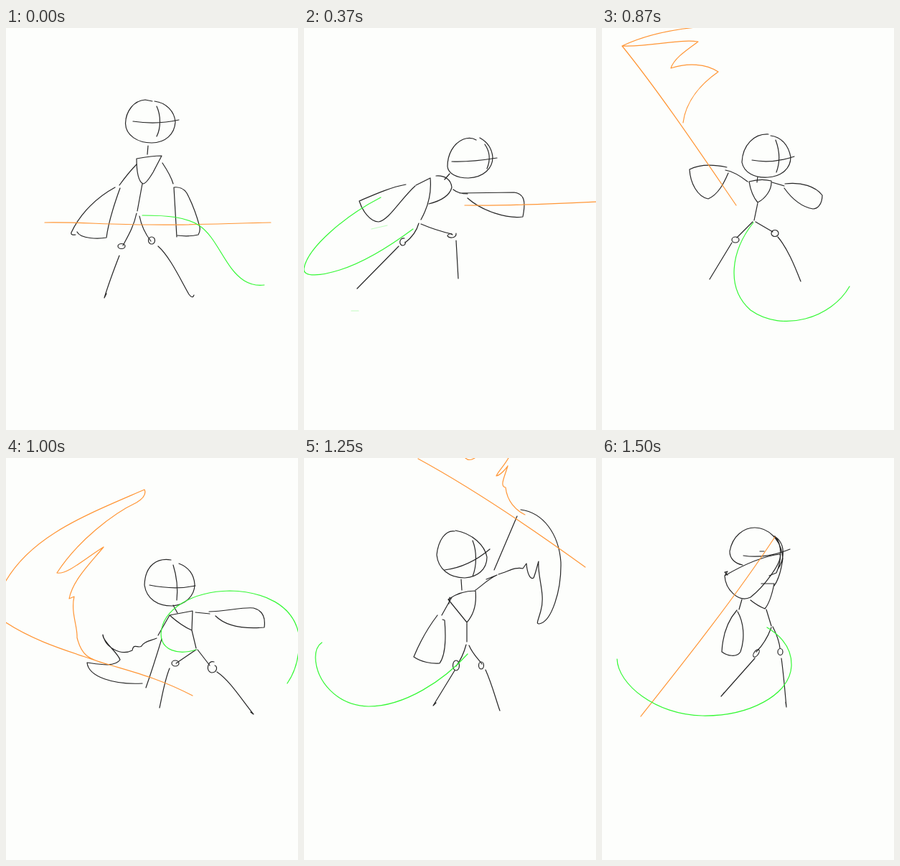
Animation of 407 by 560 pixels, one loop 1.62 s. Source, as an HTML page:

```html
<!DOCTYPE html>
<html lang="en">
<head>
<meta charset="utf-8">
<title>Sword swing sketch</title>
<style>
  html, body { margin: 0; width: 100%; height: 100%; overflow: hidden; background: #fdfefc; }
  .strip { display: flex; width: 4477px; height: 560px; animation: play 1620ms step-end infinite; }
  svg { flex: none; width: 407px; height: 560px; overflow: hidden; fill: none; stroke: #262626;
        stroke-width: 1.2; stroke-linecap: round; stroke-linejoin: round; }
  .sword { stroke: #ff9636; }
  .tail { stroke: #35f835; }
  .faint { stroke: #35f835; opacity: .3; }
  /* one pose per step along the strip */
  @keyframes play {
    0% { transform: translateX(0); }
    7.4074% { transform: translateX(-407px); }
    15.4321% { transform: translateX(-814px); }
    22.8395% { transform: translateX(-1221px); }
    46.2963% { transform: translateX(-1628px); }
    53.7037% { transform: translateX(-2035px); }
    61.7284% { transform: translateX(-2442px); }
    69.1358% { transform: translateX(-2849px); }
    77.1605% { transform: translateX(-3256px); }
    84.5679% { transform: translateX(-3663px); }
    92.5926%, 100% { transform: translateX(-4070px); }
  }
</style>
</head>
<body>
<div class="strip">

<!-- stand -->
<svg>
  <path d="M204 102L194 100C178 101 167 116 166.500 133C167 150 184 160 203 160C222 160 235 148 236 131C235 116 223 104 207 102M177 130C197 133 219 133 241 128M210 109C216 122 216 139 210 151M198 164L197 176"/>
  <path d="M182 182C193 180 205 178 217 178L205 201C199 211 194 217 191 217C185 214 182 201 182 182M190 217L183 255"/>
  <path d="M182 190C174 198 166 208 158 219M152 222C128 235 104 257 91 285Q90 289 97 288M159 223C151 245 143 268 140 292C129 294 104 294 99 284"/>
  <path d="M218 188C224 197 230 206 233 217M238 291L234 222C241 221 248 224 252 230C259 243 266 262 270 277Q271 283 268 288C259 290 247 290 239 289"/>
  <path d="M182 258C178 277 170 290 163 303M186 262C189 277 195 288 202 297M158 317C151 335 144 353 137 376L140 370M212 304C228 318 243 350 255 371Q260 378 262 372"/>
  <ellipse cx="161" cy="304" rx="5" ry="3.500"/><ellipse cx="203" cy="296" rx="4.500" ry="5"/>
  <path class="sword" d="M54 271C100 270 140 274 200 274C260 275 310 272 369 271"/>
  <path class="tail" d="M190 261C225 261 250 263 269 275C295 292 305 335 332 352Q345 360 360 358"/>
</svg>

<!-- wind up -->
<svg>
  <path d="M131 163C110 162 98 183 97 207C97 222 110 230 126 230C146 229 163 216 164 197C162 182 149 170 133 168M106 210C128 212 147 205 164 197M138 175C142 192 142 215 133 226"/>
  <path d="M133 230L113 241M131 228C133 238 155 243 184 243M159 207C172 213 181 230 185 245C190 262 194 277 200 286L212 298"/>
  <path d="M111 238C88 245 66 259 52 273L57 276C58 285 64 291 73 291C92 289 101 268 110 246"/>
  <path d="M172 212C184 218 192 225 196 232M191 236C182 254 168 265 151 274M198 234C206 247 210 262 208 275C205 286 193 287 181 287C168 286 160 284 157 277"/>
  <path d="M190 278L154 297M151 308C149 325 145 340 143 357L145 350M223 309C239 323 252 348 269 366L264 363"/>
  <ellipse cx="152" cy="299" rx="4" ry="4"/><ellipse cx="214" cy="302" rx="4" ry="3.500"/>
  <path class="sword" d="M6 272C80 275 180 274 260 271Q320 269 331 272M29 278L31 279"/>
  <path class="tail" d="M222 287C240 307 265 314 291 314C340 312 385 275 393 232Q395 215 381 204"/>
</svg>

<!-- lunge -->
<svg>
  <path d="M187 157C168 156 152 170 149 198C151 212 163 219 180 219C200 218 213 205 213 188C211 173 201 162 189 159M156 199C178 201 198 195 216 188M196 166C202 182 201 200 194 213M168 219L160 228"/>
  <path d="M150 224C166 220 184 224 196 234C192 244 182 248 172 248M168 223C178 240 183 254 180 276"/>
  <path d="M147 227L126 232M124 229C104 234 82 246 65 257C69 273 79 281 90 280C105 277 116 254 125 235"/>
  <path d="M196 231L212 236M213 234C234 235 252 240 259 250C261 263 258 272 255 275C236 275 220 261 210 242"/>
  <path d="M179 278L147 297M182 278L210 294M141 305L108 360M217 301C227 318 234 340 242 358"/>
  <ellipse cx="145" cy="299" rx="4.500" ry="4"/><ellipse cx="211" cy="296" rx="4.500" ry="3.500"/>
  <path class="sword" d="M115 261C200 262 290 260 369 257"/>
  <path class="tail" d="M187 283C200 320 180 359 135 365C95 368 62 345 54 318"/>
</svg>

<!-- thrust, held -->
<svg>
  <path d="M240 156C235 153 228 153 222 155C208 161 200 176 200 193C201 203 213 209 229 209C251 208 263 195 263 180C262 169 256 159 245 153M252 162C259 172 260 184 255 196M206 186C228 187 250 184 269 181M203 203L196 211"/>
  <path d="M184 206C196 205 205 211 206 222C203 234 190 241 174 245M156 219L176 209C178 230 173 249 163 267"/>
  <path d="M142 218C120 222 98 232 77 241C81 254 92 270 104 270C118 268 135 238 155 220"/>
  <path d="M208 225C214 230 222 231 228 231M217 230L293 229C308 231 309 243 305 263C283 266 248 255 228 237"/>
  <path d="M160 272C157 283 150 292 141 299M163 273C177 279 193 284 206 287M132 304L74 363M212 296L215 349"/>
  <path d="M140 293C132 292 132 303 138 303Q142 302 141 298M212 286C213 294 200 293 200 289Q203 285 207 288"/>
  <path class="sword" d="M224 247C285 248 345 245 408 242"/>
  <path class="tail" d="M107 236C60 260 5 305 0 335C-2 348 25 345 50 337C85 326 125 300 152 280"/>
  <path class="faint" d="M94 280L116 275M66 394H76"/>
</svg>

<!-- raise -->
<svg>
  <path d="M239 155C222 150 202 165 198 195C200 207 215 211 231 211C250 210 262 199 262 184C261 168 249 156 229 156M248 162C257 175 257 192 249 204M219 189C240 193 260 190 272 180M200 205L193 213"/>
  <path d="M203 170C190 158 178 148 163 139C164 122 178 103 195 93C206 106 214 130 212 160"/>
  <path d="M211 207L209 217M183 206C195 205 210 209 210 217C208 228 188 239 171 244C171 231 176 217 183 208M178 206L158 215M169 245L158 271"/>
  <path d="M157 214C130 217 103 227 81 241L91 235C84 244 88 257 105 261Q118 263 125 254L157 214"/>
  <path d="M155 273L141 298M160 272L191 280M132 308L121 318M115 323L88 351M199 285C205 300 206 325 209 349"/>
  <ellipse cx="136" cy="302" rx="6" ry="4" transform="rotate(-25 136 302)"/><ellipse cx="194" cy="278" rx="5" ry="4"/>
  <path class="sword" d="M148 181L220 93C245 65 280 25 306 -1M220 93C235 80 262 67 282 66Q298 67 305 79C298 55 304 41 314 41C335 42 360 65 366 86C365 74 370 70 378 75C400 95 388 130 382 162C392 135 398 105 396 80C393 40 375 5 348 -1"/>
  <path class="tail" d="M153 270C172 310 172 340 157 365C140 390 105 397 70 384C30 370 8 340 10 318Q13 302 33 287M123 308L119 318"/>
</svg>

<!-- swing over -->
<svg>
  <path d="M232 148C212 147 196 163 195 187C198 202 213 209 231 208C251 207 263 195 263 180C260 163 250 152 235 150M242 156C248 172 248 188 243 201M209 184C230 188 250 185 268 179M217 207L216 215"/>
  <path d="M205 214C216 211 228 211 236 213C237 226 227 238 217 243C211 236 207 226 205 214M217 244L212 268"/>
  <path d="M203 214C194 207 184 200 172 198M174 194C155 190 136 190 122 197C123 216 133 235 148 238C162 232 170 216 176 202"/>
  <path d="M237 215L254 220M255 217C278 214 298 221 307 233C307 246 300 252 294 252C277 249 264 237 254 223"/>
  <path d="M210 270L188 292M214 270L238 284M181 299L150 350M245 291C258 306 268 330 277 353"/>
  <ellipse cx="186" cy="295" rx="5" ry="4"/><ellipse cx="241" cy="286" rx="5" ry="4.500"/>
  <path class="sword" d="M187 247C137 174 82 92 28 25C70 5 130 -5 205 -4M28 25C65 27 106 15 134 19C116 32 100 43 96 56C120 48 145 50 162 61C139 77 117 101 113 132"/>
  <path class="tail" d="M211 271C180 310 172 362 207 393C252 425 320 404 345 360"/>
</svg>

<!-- slash down -->
<svg>
  <path d="M230 142C212 139 194 148 193 177C196 197 212 206 231 206C250 205 263 192 263 176C262 162 254 152 241 147M233 149C238 165 240 180 238 198M200 177C220 181 240 183 264 178M233 205L239 216"/>
  <path d="M212 247L228 219L260 213L259 240C247 235 237 227 228 219M259 240L265 265"/>
  <path d="M264 215L284 217M283 214C305 214 332 207 345 209Q363 214 360 236C335 238 308 236 292 220"/>
  <path d="M210 251C200 255 192 256 189 262C184 266 178 257 176 268C160 276 138 264 135 246C134 255 155 270 159 281C152 292 128 287 113 285C115 305 150 316 190 314M217 252C210 275 203 297 195 320"/>
  <path d="M265 267L237 286M267 267L284 289M228 293C221 310 218 330 214 348M294 298C312 310 328 336 345 357L341 354"/>
  <ellipse cx="236" cy="286" rx="5" ry="4"/><path d="M290 284C281 281 278 297 286 299C295 299 295 290 291 289"/>
  <path class="sword" d="M260 331C200 300 160 295 110 277C70 264 30 250 -5 226M-5 180C30 110 110 80 193 44Q197 53 182 62C150 77 100 115 71 160C85 163 110 140 136 124C118 146 93 170 88 196L95 193C90 215 100 235 99 250C105 275 115 280 140 287"/>
  <path class="tail" d="M265 267C240 275 216 268 216 245C218 210 260 186 312 185C360 186 400 205 408 245C410 270 405 295 392 314"/>
</svg>

<!-- rise -->
<svg>
  <path d="M221 121C203 119 190 133 189 156C192 176 207 187 228 187C246 186 259 174 259 157C257 140 244 127 226 122M235 132C240 147 241 167 237 181M198 167C219 168 241 163 262 153M226 188L229 200"/>
  <path d="M214 208C225 202 237 199 250 199C250 214 248 226 243 235C231 229 222 219 214 208M243 235L246 263"/>
  <path d="M214 209L202 233M200 235C187 251 178 270 171 288C179 296 191 299 201 298C207 280 208 258 205 236"/>
  <path d="M251 200L277 190M277 186C296 164 312 146 328 139C351 145 360 170 357 211C336 220 310 209 280 194"/>
  <path d="M246 265L225 288M248 265L266 288M219 296L198 347M274 297C287 310 299 333 309 355"/>
  <ellipse cx="224" cy="288" rx="5" ry="5"/><ellipse cx="268" cy="290" rx="5" ry="5.500"/>
  <path class="sword" d="M326 241C248 196 150 145 62 114C76 77 115 35 172 16C151 39 127 61 123 82C146 67 164 63 185 66C172 89 180 115 205 175"/>
  <path class="tail" d="M247 267C258 320 247 382 198 404C145 422 91 392 77 350"/>
</svg>

<!-- overhead -->
<svg>
  <path d="M210 102C197 100 187 115 185 135C187 155 203 167 224 167C242 166 255 155 255 138C252 122 235 105 211 101M235 115C241 130 241 150 235 165M196 156C220 153 240 143 259 127M219 169L220 184"/>
  <path d="M201 197C212 189 225 185 239 185C241 205 235 220 227 229L201 197L206 194L192 219M202 203L203 194M227 230L227 256"/>
  <path d="M239 184C248 178 256 169 269 163L254 169M265 156L297 81M271 162C285 158 295 151 305 154L310 147C311 160 315 170 320 167C323 160 325 150 327 144C325 165 337 190 330 213C326 228 323 231 328 231C345 228 359 185 358 145C355 105 333 76 302 72"/>
  <path d="M186 219C170 240 160 260 153 277C163 284 178 287 189 286C197 275 198 250 196 226L193 225"/>
  <path d="M226 260C222 275 218 282 212 290M230 261C235 273 243 280 248 287M210 296L180 345L184 341M253 295C262 315 267 335 273 352"/>
  <ellipse cx="212" cy="289" rx="4.500" ry="7"/><ellipse cx="247" cy="289" rx="3.500" ry="5"/>
  <path class="sword" d="M159 1C240 45 320 100 392 152M225 0Q230 5 238 0M286 -2C280 10 271 18 268 25C275 24 285 10 284 11C280 25 272 40 281 41C283 60 295 73 308 79"/>
  <path class="tail" d="M228 273C195 310 140 346 90 346C45 345 17 310 16 278Q16 263 25 257"/>
</svg>

<!-- bring down -->
<svg>
  <path d="M212 99C195 98 183 112 182 132C184 149 200 158 220 158C240 157 253 145 254 131C250 115 234 102 214 99M238 112C246 128 245 146 239 158M196 146C219 147 240 138 260 127M214 160L213 181"/>
  <path d="M204 191C214 183 227 180 239 180C240 197 235 211 227 220L204 191M227 221L232 245"/>
  <path d="M204 192L191 214M187 216C172 234 164 256 160 274C169 281 183 283 191 278C199 258 198 238 191 218"/>
  <path d="M239 181C249 174 255 164 260 154M258 155C264 130 275 111 289 99C304 109 308 135 298 160C288 171 273 166 262 158"/>
  <path d="M231 248C226 262 220 271 214 280M234 248C239 260 245 269 248 277M211 288L173 338M252 287C257 307 261 330 265 350"/>
  <ellipse cx="213" cy="281" rx="4" ry="6"/><ellipse cx="248" cy="280" rx="4" ry="5"/>
  <path class="sword" d="M283 139C266 92 244 40 226 -3"/>
  <path class="tail" d="M230 254C245 300 185 352 115 353C62 352 20 315 18 280Q19 273 23 268"/>
</svg>

<!-- recover -->
<svg>
  <path d="M196 149C185 147 178 140 178 130C182 108 198 97 213 97C230 97 250 112 252 140C250 155 247 168 240 178M197 136C217 139 240 136 262 127M220 130H226M241 109C252 120 250 145 243 160L233 164M240 109C256 118 255 140 245 155"/>
  <path d="M171 164C195 150 222 137 248 134C252 145 225 180 207 194C190 202 172 183 171 164L175 158L171 159L175 163"/>
  <path d="M222 175L240 175C237 190 233 203 227 210Q217 206 207 198M195 197L191 211M229 211L236 234"/>
  <path d="M188 212C174 228 168 250 167 270C175 276 188 278 193 270C200 250 197 228 189 214"/>
  <path d="M236 236C231 250 224 261 215 270M238 235C243 245 247 255 248 265M213 279L166 332L170 327M250 279C253 300 255 325 257 347L256 340"/>
  <ellipse cx="215" cy="272" rx="3" ry="6" transform="rotate(35 215 272)"/><ellipse cx="248.500" cy="270" rx="3.500" ry="4.500"/>
  <path class="sword" d="M241 110C185 195 115 283 54 360"/>
  <path class="tail" d="M230 236C250 248 265 265 264 290C262 330 205 360 140 359C75 358 22 315 21 280"/>
</svg>

</div>
</body>
</html>
```
